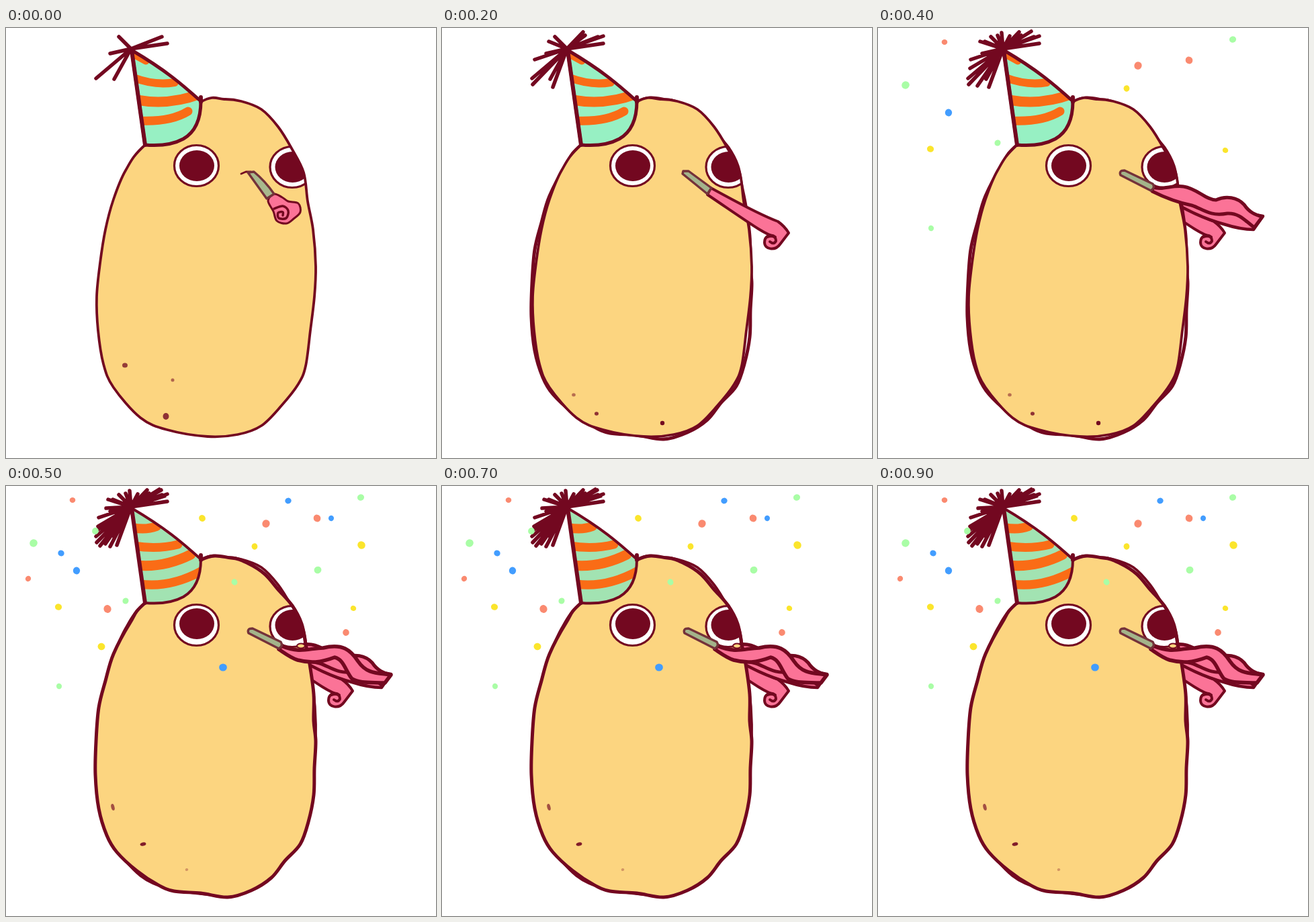
Recreate the animation shown at these times as an HTML page with a canvas. Size 640 by 640 pixels, loop 1 s.

```html
<!DOCTYPE html>
<html lang="en">
<head>
<meta charset="utf-8">
<title>Party potato</title>
<style>
  html, body { margin: 0; height: 100%; overflow: hidden; background: #fff; }
  canvas { display: block; width: 100vw; height: 100vh; }
</style>
</head>
<body>
<canvas id="stage" width="640" height="640"></canvas>
<script>
const ctx = document.getElementById('stage').getContext('2d');
const INK = '#730820', SKIN = '#fcd580', PINK = '#fb7397', MINT = '#97f0c3', SAGE = '#a2e3b2', ORANGE = '#fa6c16';
const CONFETTI = { s: '#fa8a70', y: '#fbe52c', b: '#429dff', g: '#a9fda6' };

// Smooth path through points given as "x,y x,y ..."
function curve(text, closed = true) {
  const pts = text.trim().split(/\s+/).map(p => p.split(',').map(Number));
  const n = pts.length, path = new Path2D();
  const at = i => closed ? pts[(i + n) % n] : pts[Math.max(0, Math.min(n - 1, i))];
  path.moveTo(...pts[0]);
  for (let i = 0; i < (closed ? n : n - 1); i++) {
    const [a, b, c, d] = [at(i - 1), at(i), at(i + 1), at(i + 2)];
    path.bezierCurveTo(b[0] + (c[0] - a[0]) / 6, b[1] + (c[1] - a[1]) / 6,
      c[0] - (d[0] - b[0]) / 6, c[1] - (d[1] - b[1]) / 6, c[0], c[1]);
  }
  if (closed) path.closePath();
  return path;
}
const svg = d => new Path2D(d);

function paint(path, fill, width = 0, ink = INK) {
  if (fill) { ctx.fillStyle = fill; ctx.fill(path); }
  if (width) { ctx.lineWidth = width; ctx.strokeStyle = ink; ctx.stroke(path); }
}

function oval(x, y, rx, ry, fill, width, turn = 0) {
  const path = new Path2D();
  path.ellipse(x, y, rx, ry, turn, 0, 7);
  paint(path, fill, width);
}

function clipped(path, draw) {
  ctx.save();
  ctx.clip(path);
  draw();
  ctx.restore();
}

const bodies = [
  { width: 3.8, eyeY: 205, path: curve(`207,174 178,212 160,255 148,300 140,350 135,400 137,450 145,500 160,535
    200,580 240,598 300,608 345,605 380,592 410,562 435,530 446,503 453,450 459,400 461,355 457,300
    449,258 443,215 425,179 405,147 380,121 350,109 325,106 290,110`) },
  { width: 5, eyeY: 207, path: curve(`207,174 185,203 160,250 148,290 138,330 134,380 133,430 138,480 150,520
    165,545 195,573 225,593 250,603 290,606 330,612 365,602 395,583 415,558 438,533 450,500 458,460
    459,420 461,380 458,350 458,310 452,265 446,235 440,205 426,178 405,154 385,131 360,115 335,107 290,110`) }
];

function drawBody(body) {
  paint(body.path, SKIN);
  clipped(body.path, () => {
    for (const [x, y] of [[283.5, body.eyeY], [426, body.eyeY + 2]]) {
      oval(x, y, 33, 30.5, '#fff', 3.2);
      oval(x + 0.5, body.eyeY === 205 ? y : y - 2, 26, 23, INK);
    }
  });
  paint(body.path, null, body.width);
}

// Hat stripes: [path, width]
const hat = svg('M187 33L207 174Q242 177 264 165Q290 150 290 109C262 84 238 63 187 33Z');
const hats = [
  { base: MINT, stripe: ORANGE, width: 5, rows: [
    ['M188 38L208 49', 11], ['M190 74Q222 86 251 81', 12], ['M194 107Q245 116 292 97', 15], ['M199 138Q245 140 271 124', 13]] },
  { base: ORANGE, stripe: SAGE, width: 4, rows: [
    ['M188 36L203 48', 11], ['M190 76Q222 82 243 77', 12], ['M194 106Q235 108 260 97', 12],
    ['M199 139Q250 138 292 112', 13], ['M204 166Q245 165 284 147', 13]] },
  { base: SAGE, stripe: ORANGE, width: 4, rows: [
    ['M188 62Q208 66 224 60', 14], ['M190 89Q225 95 256 87', 13], ['M194 118Q235 122 275 102', 15], ['M200 146Q245 152 292 126', 13]] }
];

function drawHat({ base, stripe, width, rows }) {
  paint(hat, base);
  clipped(hat, () => rows.forEach(([d, w]) => paint(svg(d), null, w, stripe)));
  paint(hat, null, width);
  paint(svg('M187 33L207 174M290 103V110'), null, 6);
}

// Each set of strands joins the earlier ones
const strands = [
  '168,13 155,38 134,75 161,76 232,13 240,23',
  '210,6 159,20 138,47 135,84 165,88 213,11 240,12',
  '184,7 228,5 152,20 137,60 148,86 196,12 178,11',
  '231,6 236,15 134,67 140,89 155,90 149,33'
];

function drawTassel(count) {
  const path = new Path2D();
  for (const tip of strands.slice(0, count).join(' ').split(' ')) {
    path.moveTo(186, 31);
    path.lineTo(...tip.split(',').map(Number));
  }
  paint(path, null, 5.5);
}

const mouthpieces = [
  ['M360 215L369 214Q386 228 399 247L388 254Z', '#a8b98d'],
  ['M360 216L368 212L399 247L390 253Z', '#c9d2bd'],
  ['M358 217L359 213L367 213L401 238L395 247Z', '#a3b48c'],
  ['M361 219Q358 212 367 212L409 232Q413 238 406 242Z', '#a3b48a']
];
const tail = svg('M350 217L357 214L364 214');

const curls = [
  curve('390,257 399,247 411,252 420,258 435,261 438,274 428,284 417,291 403,287 398,273'),
  curve('391,260 398,250 411,257 430,257 439,271 428,283 416,291 401,287 399,272')
];
const spiral = curve('399,269 412,265 420,272 417,283 406,283 405,275 412,274 412,279', false);
const unrolled = svg('M400 238C430 254 468 276 500 288Q510 295 516 305L503 322C496 332 480 330 480 319C480 309 490 306 496 311C480 307 460 292 395 248Z');
const hook = svg('M484 311Q497 307 497 317Q494 323 488 318');
const straight = svg('M412 237C442 239 480 264 573 280L559 300Q540 300 515 292C478 282 455 268 408 243Z');
const waveUp = svg('M409 237C422 242 440 233 455 236C475 239 488 256 503 256C518 249 535 252 545 263C553 275 562 278 572 281L560 297C545 285 536 275 520 276C493 281 483 269 467 264C447 260 428 253 408 243Z');
const waveDown = svg('M410 238C438 250 452 241 472 241C501 234 513 244 524 261C537 280 552 278 573 281L564 293C543 292 527 294 515 287C505 275 503 258 489 255C468 263 453 264 434 259C424 256 415 249 406 243Z');

const blowers = {
  curlA() { paint(curls[0], PINK, 3); paint(spiral, null, 3.5); },
  curlB() { paint(curls[1], PINK, 3.2); paint(spiral, null, 3); },
  unrolled() { paint(unrolled, PINK, 4); paint(hook, null, 4); },
  straight() { paint(straight, PINK, 4.5); paint(svg('M548 288L552 284'), null, 4); },
  waveUp() { paint(waveUp, PINK, 5); },
  waveDown() { paint(waveDown, PINK, 5.5); oval(439, 238, 6, 3.5, SKIN, 2); }
};

// Spots: x, y, rx, ry, opacity
const spots = [
  [[177, 502, 4, 3.5, .75], [248, 524, 2.5, 2.5, .55], [238, 578, 4.5, 5, .8]],
  [[164, 489, 2.5, 2.5, .7]],
  [[196, 546, 2.8, 2.5, .5], [230, 574, 3, 2.8, .8], [328, 588, 3.2, 3.2, 1]],
  [[175, 492, 3.5, 2.8, .3], [269, 515, 3, 3, .85], [212, 555, 3.5, 5, .85], [310, 571, 3.5, 2.6, .75]],
  [[159, 478, 2.5, 5, .65], [204, 533, 4.5, 2.6, .9], [269, 571, 2.3, 2, .3]]
];

function drawSpots(set) {
  for (const [x, y, rx, ry, alpha] of spots[set]) {
    ctx.globalAlpha = alpha;
    oval(x, y, rx, ry, INK, 0, set === 4 ? -.25 : 0);
  }
  ctx.globalAlpha = 1;
  if (set === 1) paint(svg('M191 519Q194 523 197 517M235 562Q226 560 228 567Q231 571 235 569'), null, 3, '#8a2932');
}

const bits = `99,21,s 292,48,y 387,56,s 420,22,b 463,48,s 484,48,b 528,17,g 529,88,y 370,90,y 464,125,g 517,182,y 506,218,s
  41,85,g 82,100,b 105,126,b 33,138,s 78,180,y 151,183,s 178,171,g 142,239,y 79,298,g 133,67,g 323,270,b 340,143,g`
  .split(/\s+/).map(b => b.split(','));

function drawConfetti(step) {
  bits.forEach(([x, y, colour], i) => {
    if (step === 4 && i % 2) return;
    if (step % 2 === 0 && i > 21) return;
    const r = 4 + (i * 7 % 5) * .4;
    oval(+x, +y, r + .3, r, CONFETTI[colour], 0, i);
  });
}

// body, hat, tassel, blower, mouthpiece, spots, leftovers behind the body
const poses = [
  [0, 0, 1, 'curlA', 0, 0, []],
  [1, 1, 2, 'curlB', 1, 1, []],
  [0, 0, 2, 'unrolled', 2, 2, []],
  [1, 2, 3, 'straight', 3, 3, ['unrolled']],
  [0, 0, 3, 'waveUp', 3, 2, ['unrolled', 'straight']],
  [1, 2, 4, 'waveDown', 3, 4, ['unrolled', 'straight', 'waveUp']],
  [0, 0, 4, 'waveUp', 3, 0, ['unrolled', 'straight', 'waveDown']]
];

function draw(step) {
  const [body, hatNo, tassel, blower, mouth, spotSet, behind] = poses[step < 5 ? step : 6 - step % 2];
  ctx.fillStyle = '#fff';
  ctx.fillRect(0, 0, 640, 640);
  behind.forEach(name => blowers[name]());
  if (step > 1) paint(bodies[1 - body].path, null, bodies[1 - body].width);
  drawBody(bodies[body]);
  drawSpots(spotSet);
  if ([0, 1, 3].includes(step)) paint(tail, null, 2.8);
  blowers[blower]();
  const [shape, fill] = mouthpieces[mouth];
  paint(svg(shape), fill, 3.4, '#74323a');
  drawHat(hats[hatNo]);
  drawTassel(tassel);
  if (step > 3) drawConfetti(step);
}

ctx.lineCap = ctx.lineJoin = 'round';
let shown = -1;
function tick(now) {
  const step = Math.floor(now / 100) % 10;
  if (step !== shown) draw(shown = step);
  requestAnimationFrame(tick);
}
tick(0);
</script>
</body>
</html>
```
